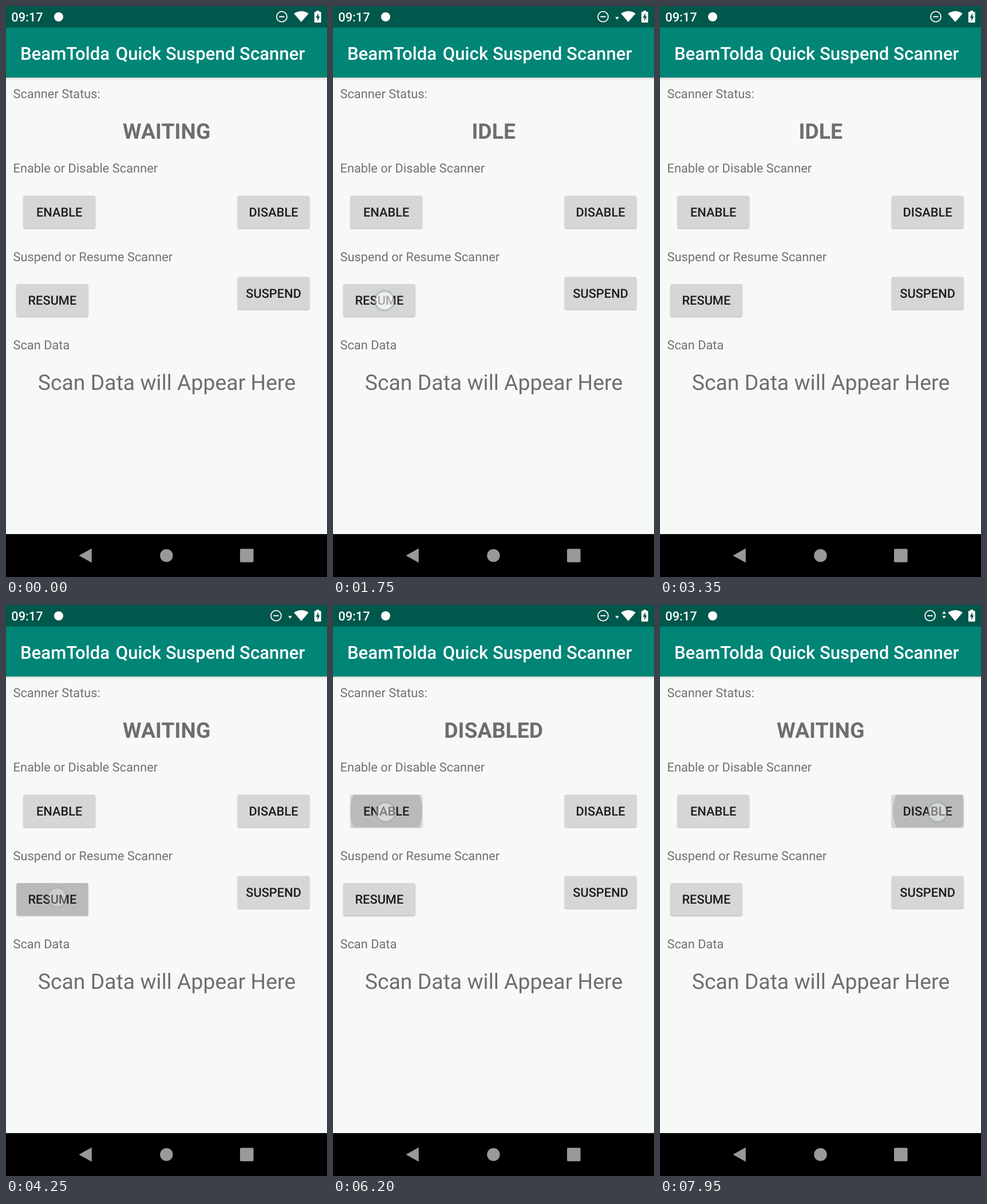
Animation of 561 by 998 pixels, one loop 8000 ms. Source, as an HTML page:

```html
<!DOCTYPE html>
<html lang="en">
<head>
<meta charset="utf-8">
<title>Quick Suspend Scanner</title>
<style>
  html, body { margin: 0; width: 100%; height: 100%; overflow: hidden; background: #f7f9f7; }
  svg { display: block; width: 100%; height: 100%; }
  text { font-family: Roboto, sans-serif; text-rendering: geometricPrecision; }
  .label { font-size: 21.82px; fill: #707170; }
  .large { font-size: 37.4px; fill: #6d6e6d; text-anchor: middle; }
  .status { font-weight: 700; }
  .title { font-size: 31.17px; font-weight: 500; fill: #fff; }
  .clock { font-size: 21.82px; font-weight: 500; fill: #fff; }
  .caption { font-size: 21.82px; font-weight: 500; fill: #1b1c1b; text-anchor: middle; }
  .face { fill: #d6d7d5; }
  .icons { fill: #fff; }
  .nav { fill: #999; }
</style>
</head>
<body>
<svg id="stage" viewBox="0 0 561 998" preserveAspectRatio="none">
  <defs>
    <linearGradient id="barShadow" x2="0" y2="1">
      <stop offset="0" stop-color="#000" stop-opacity=".2"/>
      <stop offset=".4" stop-color="#000" stop-opacity=".07"/>
      <stop offset="1" stop-color="#000" stop-opacity="0"/>
    </linearGradient>
    <filter id="soft" x="-10%" y="-20%" width="120%" height="140%">
      <feGaussianBlur stdDeviation="1.3"/>
    </filter>
  </defs>

  <rect width="561" height="998" fill="#f7f9f7"/>
  <rect y="124.5" width="561" height="6" fill="url(#barShadow)"/>
  <rect y="37" width="561" height="88" fill="#008577"/>
  <rect width="561" height="37.5" fill="#00574b"/>

  <text class="clock" x="9.3" y="27">09:17</text>
  <g class="icons">
    <circle cx="92" cy="19" r="8"/>
    <g id="quiet">
      <circle cx="482" cy="18.7" r="9" fill="none" stroke="#fff" stroke-width="1.8"/>
      <rect x="477.3" y="17.7" width="9.4" height="2"/>
    </g>
    <path id="arrowUp" d="M493.3 15.6h6.4l-3.2-5z"/>
    <path id="arrowDown" d="M493.3 19h6.4l-3.2 5z"/>
    <path d="M503.2 13.2Q516 5 528.8 13.2L516 28z"/>
    <path d="M542.3 10.2V8.3h5v1.9h2.2q1.2 0 1.2 1.2v16.4q0 1.2-1.2 1.2h-9.4q-1.2 0-1.2-1.2V11.4q0-1.2 1.2-1.2z"/>
    <path d="M546 12.5l-4.5 8h2.7v6l4.4-8.2H546z" fill="#00574b"/>
  </g>

  <text class="title" x="24.9" y="94">BeamTolda</text>
  <text class="title" x="191.8" y="94">Quick Suspend Scanner</text>

  <text class="label" x="12.5" y="161">Scanner Status:</text>
  <text class="large status" id="status" x="280.7" y="232"></text>
  <text class="label" x="12.5" y="291">Enable or Disable Scanner</text>
  <text class="label" x="12.5" y="445.5">Suspend or Resume Scanner</text>
  <text class="label" x="12.5" y="600">Scan Data</text>
  <text class="large" x="281" y="671">Scan Data will Appear Here</text>

  <g id="buttons"></g>

  <g id="spot">
    <circle r="18" fill="none" stroke="#7f9db3" stroke-opacity=".22" stroke-width="3"/>
    <circle r="16" fill="#fff" fill-opacity=".62"/>
    <circle r="16.2" fill="none" stroke="#7d9bb5" stroke-opacity=".6" stroke-width="1.4"/>
  </g>

  <rect y="923" width="561" height="75"/>
  <g class="nav">
    <path d="M127.5 960.5L149.8 948v25z"/>
    <circle cx="280.4" cy="960.5" r="11.2"/>
    <rect x="409" y="948.7" width="23.6" height="23.6" rx="1.8"/>
  </g>
</svg>

<script>
const LOOP = 8000, STEP = 50;
const WIDTH = 125.2, HEIGHT = 56.4;
const HALF_DIAGONAL = Math.hypot(WIDTH, HEIGHT) / 2;
const $ = id => document.getElementById(id);
const clamp = v => Math.max(0, Math.min(1, v));
const mix = (a, b, p) => a + (b - a) * p;

function add(parent, tag, attrs) {
  const node = document.createElementNS("http://www.w3.org/2000/svg", tag);
  for (const key in attrs) node.setAttribute(key, attrs[key]);
  return parent.appendChild(node);
}

function set(node, attrs) {
  for (const key in attrs) node.setAttribute(key, attrs[key]);
}

function makeButton(name, x, y) {
  const group = add($("buttons"), "g", {});
  const box = { x, y, width: WIDTH, height: HEIGHT, rx: 2.6 };
  add(group, "rect", { ...box, y: y + 1.3, opacity: 0.28, filter: "url(#soft)" });
  add(group, "rect", { ...box, class: "face" });
  add(add(group, "clipPath", { id: "clip" + name }), "rect", box);
  const ripple = add(group, "circle", { "clip-path": `url(#clip${name})` });
  const cx = x + WIDTH / 2, cy = y + HEIGHT / 2;
  add(group, "text", { class: "caption", x: cx, y: cy + 8 }).textContent = name;
  return { ripple, cx, cy };
}

const buttons = {
  enable: makeButton("ENABLE", 30.6, 331.6),
  disable: makeButton("DISABLE", 405, 331.6),
  resume: makeButton("RESUME", 18.3, 486.1),
  suspend: makeButton("SUSPEND", 405, 473.6)
};

// Touch start, finger release, and touch point
const taps = [
  { button: "suspend", start: 650, release: 850, x: 471, y: 504 },
  { button: "resume", start: 1750, release: 1950, x: 90, y: 515 },
  { button: "suspend", start: 3000, release: 3100, x: 471, y: 504 },
  { button: "resume", start: 4050, release: 4250, x: 89, y: 511 },
  { button: "disable", start: 4950, release: 5200, x: 482, y: 362 },
  { button: "enable", start: 6050, release: 6250, x: 92, y: 362 },
  { button: "disable", start: 7800, release: 8000, x: 485, y: 362 }
];

const statuses = [
  [0, "WAITING"], [850, "IDLE"], [1950, "WAITING"], [3100, "IDLE"],
  [4250, "WAITING"], [5200, "DISABLED"], [6900, "WAITING"]
];

// Number of network arrows shown
const traffic = [[0, 0], [850, 1], [1950, 2], [3200, 0], [4200, 1], [6250, 2]];

const valueAt = (table, t) => table.filter(([from]) => from <= t).pop()[1];

function drawTap(tap, t) {
  const { ripple, cx, cy } = buttons[tap.button];
  const enter = clamp((t - tap.start - 50) / 225);
  const grow = 1 - (1 - enter) ** 3;
  const fade = clamp(1 - (t - tap.release) / 250);
  set(ripple, {
    cx: mix(tap.x, cx, grow),
    cy: mix(tap.y, cy, grow),
    r: mix(WIDTH * 0.3, HALF_DIAGONAL + 0.5, grow),
    opacity: 0.135 * fade * clamp(enter * 3)
  });
  set($("spot"), {
    transform: `translate(${tap.x} ${tap.y})`,
    opacity: clamp((tap.release + 100 - t) / 225)
  });
}

function draw(t) {
  const label = valueAt(statuses, t);
  if ($("status").textContent !== label) $("status").textContent = label;

  const arrows = valueAt(traffic, t);
  set($("quiet"), { transform: `translate(${arrows ? -10 : 0} 0)` });
  set($("arrowDown"), { opacity: arrows > 0 ? 1 : 0 });
  set($("arrowUp"), { opacity: arrows > 1 ? 1 : 0 });

  for (const name in buttons) set(buttons[name].ripple, { opacity: 0 });
  set($("spot"), { opacity: 0 });
  const tap = taps.find(({ start, release }) => t >= start && t < release + 250);
  if (tap) drawTap(tap, t);
}

const began = performance.now();
function tick() {
  const elapsed = (performance.now() - began) % LOOP;
  draw(Math.floor(elapsed / STEP) * STEP);
  requestAnimationFrame(tick);
}
tick();
</script>
</body>
</html>
```
